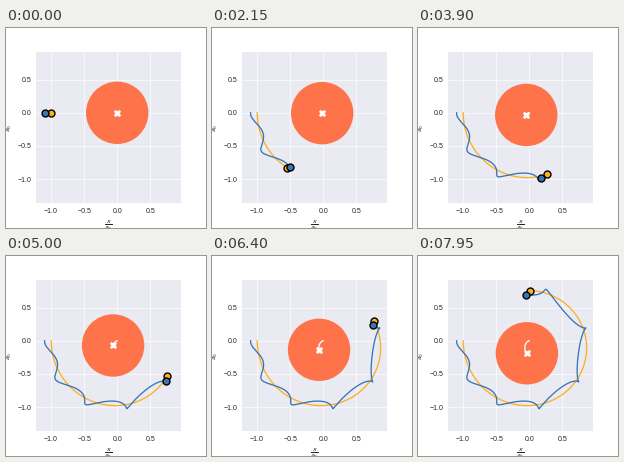
These frames come from a looping animation (200x200 px, 8000 ms). A matplotlib script:

```python
import numpy as np
import matplotlib.pyplot as plt
from matplotlib.animation import FuncAnimation
from matplotlib.patches import Circle

SCALE = 66.2            # pixels per unit
X0, Y0 = 111.2, 84.8    # pixel position of the data origin
FRAMES, STEP = 160, 50  # frame count, ms per frame
SUB = 4                 # trail samples per frame
SUN, PLANET, MOON = "#ff734a", "#fdb022", "#3a76b4"
DARK = "0.15"

plt.rcParams.update({
    "font.family": "Liberation Sans",
    "mathtext.fontset": "dejavusans",
    "text.color": DARK,
    "axes.labelcolor": DARK,
})


def polar(r, angle):
    return r * np.array([np.cos(angle), np.sin(angle)])


def kepler(mean, ecc):
    """True anomaly and distance (in semi-major axes) for a mean anomaly."""
    e = mean + ecc * np.sin(mean)
    for _ in range(8):
        e -= (e - ecc * np.sin(e) - mean) / (1 - ecc * np.cos(e))
    true = e + 2 * np.arctan2(ecc * np.sin(e),
                              1 + np.sqrt(1 - ecc ** 2) - ecc * np.cos(e))
    return true, 1 - ecc * np.cos(e)


t = np.arange((FRAMES - 1) * SUB + 1) * STEP / 1000 / SUB

# planet: slightly eccentric, slowest and farthest at the start
w = 2 * np.pi / 12 * t
theta = 0.556 * t - 0.252 * np.sin(w) + 0.039 * np.sin(2 * w)
radius = 63.9 + 2.1 * np.cos(w)

# sun: wobbles about a centre of mass that drifts downwards
sun = 2.2 * np.array([np.cos(theta) - 1, np.sin(theta) - theta])
planet = sun - polar(radius, theta)

# moon: clockwise ellipse, starting at its far point on the left
turns = t / 1.395 - 0.045 * np.sin(2 * np.pi * t / 8)
true, reach = kepler(2 * np.pi * turns + np.pi, 0.5)
size = 4.4 + 0.9 * (1 - np.exp(-t))
moon = planet + polar(size * reach, -true)

fig = plt.figure(figsize=(4, 4), dpi=50, facecolor="white")
ax = fig.add_axes([30 / 200, 25 / 200, 145 / 200, 151 / 200])
ax.set_facecolor("#eaeaf2")
ax.set_xlim((30 - X0) / SCALE, (175 - X0) / SCALE)
ax.set_ylim((Y0 - 175) / SCALE, (Y0 - 24) / SCALE)
ax.set_xticks([-1, -0.5, 0, 0.5])
ax.set_yticks([-1, -0.5, 0, 0.5])
ax.tick_params(length=0, pad=7, labelsize=10, labelcolor=DARK)
ax.set_axisbelow(True)
ax.grid(color="white", lw=1)
for side in ax.spines.values():
    side.set_visible(False)
ax.set_xlabel(r"$\frac{x}{a_0}$", fontsize=13)
ax.set_ylabel(r"$\frac{y}{a_0}$", fontsize=13)

disc = ax.add_patch(Circle((0, 0), 31.2 / SCALE, fc=SUN, ec="none", zorder=2))


def body(path, color, marker, edge, width, z):
    line, = ax.plot([], [], color=color, lw=1.9, zorder=z)
    dot, = ax.plot([], [], marker, color=color, ms=10, mec=edge, mew=width,
                   zorder=z + 5)
    return path / SCALE, line, dot


bodies = [
    body(sun, "white", "X", "white", 1, 3),
    body(planet, PLANET, "o", "black", 2, 4),
    body(moon, MOON, "o", "black", 2, 5),
]


def draw(n):
    now = n * SUB
    disc.center = tuple(sun[:, now] / SCALE)
    for path, line, dot in bodies:
        line.set_data(path[0, :now + 1], path[1, :now + 1])
        dot.set_data(path[0, now:now + 1], path[1, now:now + 1])
    return [disc] + [a for _, line, dot in bodies for a in (line, dot)]


anim = FuncAnimation(fig, draw, frames=FRAMES, interval=STEP,
                     repeat=True, repeat_delay=0, blit=False)
plt.show()
```
